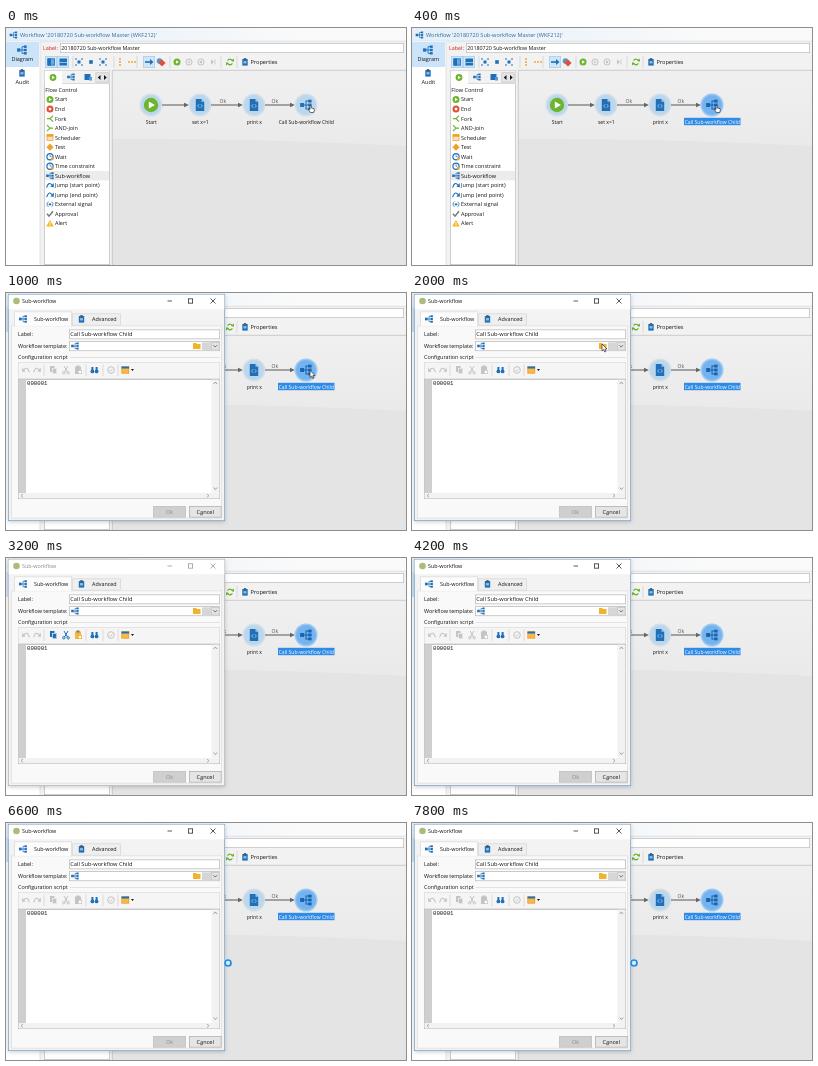
Animation of 400 by 237 pixels, one loop 8 s. Source, as an HTML page with a canvas:

```html
<!DOCTYPE html>
<html lang="en">
<head>
<meta charset="utf-8">
<style>
  html, body { margin: 0; width: 100%; height: 100%; overflow: hidden; background: #f2f2f2; }
  canvas { display: block; width: 400px; height: 237px; }
</style>
</head>
<body>
<canvas></canvas>
<script>
const W = 400, H = 237, LOOP = 8000, STEP = 200;
const BLUE = '#1f70b8', GREEN = '#6cb52d', ORANGE = '#f2a024', RED = '#e0503c', GREY = '#c4c4c4', INK = '#141414';
const canvas = document.querySelector('canvas');
const c = canvas.getContext('2d');
const dpr = window.devicePixelRatio || 1;
canvas.width = W * dpr;
canvas.height = H * dpr;

function rect(x, y, w, h, fill, border) {
  if (fill) { c.fillStyle = fill; c.fillRect(x, y, w, h); }
  if (border) {
    c.strokeStyle = border;
    c.lineWidth = 0.7;
    c.strokeRect(x + 0.35, y + 0.35, w - 0.7, h - 0.7);
  }
}
function line(points, color, width = 0.8) {
  c.beginPath();
  points.forEach(([x, y]) => c.lineTo(x, y));
  c.strokeStyle = color;
  c.lineWidth = width;
  c.stroke();
}
function shape(points, fill, border) {
  c.beginPath();
  points.forEach(([x, y]) => c.lineTo(x, y));
  c.closePath();
  c.fillStyle = fill;
  c.fill();
  if (border) { c.strokeStyle = border; c.lineWidth = 0.7; c.stroke(); }
}
function disc(x, y, r, fill) {
  c.beginPath();
  c.arc(x, y, r, 0, 7);
  c.fillStyle = fill;
  c.fill();
}
function ring(x, y, r, color, width = 1, from = 0, to = 7) {
  c.beginPath();
  c.arc(x, y, r, from, to);
  c.strokeStyle = color;
  c.lineWidth = width;
  c.stroke();
}
function text(str, x, y, size = 5.4, color = INK, align = 'left', family = '"Open Sans", sans-serif') {
  c.font = `${size}px ${family}`;
  c.textAlign = align;
  c.textBaseline = 'alphabetic';
  c.fillStyle = color;
  c.fillText(str, x, y + size * 0.36);
}

// Icons, each centred on x, y
function flow(x, y, s = 1, color = BLUE) {
  line([[x - 3 * s, y], [x + 3 * s, y]], color, 0.8 * s);
  line([[x + 3 * s, y - 3 * s], [x, y - 3 * s], [x, y + 3 * s], [x + 3 * s, y + 3 * s]], color, 0.8 * s);
  rect(x - 4.5 * s, y - 1.5 * s, 3 * s, 3 * s, color);
  for (const d of [-3, 0, 3]) rect(x + 1.7 * s, y + (d - 1.1) * s, 2.6 * s, 2.2 * s, color);
}
function play(x, y, r, color = GREEN) {
  disc(x, y, r, color);
  shape([[x - r * 0.3, y - r * 0.5], [x + r * 0.55, y], [x - r * 0.3, y + r * 0.5]], '#fff');
}
function clipboard(x, y, s = 1) {
  rect(x - 3 * s, y - 3.3 * s, 6 * s, 7.3 * s, BLUE);
  rect(x - 1.3 * s, y - 4.3 * s, 2.6 * s, 2 * s, '#555');
  rect(x - 1.6 * s, y - 1 * s, 3.2 * s, 2.6 * s, '#8fc0e8');
}
function script(x, y) {
  shape([[x - 4.2, y - 6], [x + 1.5, y - 6], [x + 4.2, y - 3.3], [x + 4.2, y + 6], [x - 4.2, y + 6]], BLUE);
  shape([[x + 1.5, y - 6], [x + 4.2, y - 3.3], [x + 1.5, y - 3.3]], '#9cc8ec');
  line([[x - 0.8, y - 0.8], [x - 2.4, y + 1], [x - 0.8, y + 2.8]], '#c5dff3', 0.7);
  line([[x + 0.8, y - 0.8], [x + 2.4, y + 1], [x + 0.8, y + 2.8]], '#c5dff3', 0.7);
}
function arrow(x, y, color = BLUE) {
  line([[x - 4, y], [x + 2, y]], color, 1.6);
  shape([[x + 1, y - 3], [x + 4.5, y], [x + 1, y + 3]], color);
}
function curl(x, y, color, dir = 1) {
  c.beginPath();
  c.moveTo(x - 3.4 * dir, y + 2.4);
  c.quadraticCurveTo(x - 1.5 * dir, y - 4.5, x + 2.4 * dir, y);
  c.strokeStyle = color;
  c.lineWidth = 1.1;
  c.stroke();
  shape([[x + 3.8 * dir, y - 2.2], [x + 3.8 * dir, y + 2], [x + 0.4 * dir, y + 1.6]], color);
}
function refresh(x, y) {
  ring(x, y, 2.7, GREEN, 1.2, 0.5, 2.9);
  ring(x, y, 2.7, GREEN, 1.2, 3.6, 6);
  shape([[x + 1, y - 1.2], [x + 4, y - 3.5], [x + 4, y - 0.3]], GREEN);
  shape([[x - 1, y + 1.2], [x - 4, y + 3.5], [x - 4, y + 0.3]], GREEN);
}
function fork(x, y) {
  line([[x - 3, y], [x, y], [x + 3, y - 3]], GREEN, 1.2);
  line([[x, y], [x + 3, y + 3]], GREEN, 1.2);
}
function diamond(x, y, color) {
  shape([[x, y - 3.6], [x + 3.6, y], [x, y + 3.6], [x - 3.6, y]], color);
}
function clock(x, y) {
  ring(x, y, 3.1, BLUE, 1.2);
  line([[x, y - 2], [x, y], [x + 1.5, y]], BLUE, 0.7);
  disc(x + 2.2, y + 2.2, 1.4, ORANGE);
}

const ACTIVITIES = [
  ['Start', (x, y) => play(x, y, 3.5)],
  ['End', (x, y) => { disc(x, y, 3.5, RED); rect(x - 1.2, y - 1.2, 2.4, 2.4, '#fff'); }],
  ['Fork', fork],
  ['AND-join', (x, y) => { c.save(); c.translate(2 * x, 0); c.scale(-1, 1); fork(x, y); c.restore(); }],
  ['Scheduler', (x, y) => { rect(x - 3.3, y - 3.3, 6.6, 6.6, '#fbe3bd', ORANGE); rect(x - 3.3, y - 3.3, 6.6, 2.4, ORANGE); }],
  ['Test', (x, y) => diamond(x, y, ORANGE)],
  ['Wait', clock],
  ['Time constraint', clock],
  ['Sub-workflow', (x, y) => flow(x, y, 0.85)],
  ['Jump (start point)', (x, y) => curl(x, y, BLUE)],
  ['Jump (end point)', (x, y) => curl(x, y, BLUE)],
  ['External signal', (x, y) => { disc(x, y, 1.2, BLUE); ring(x, y, 3, BLUE, 0.8, -1, 1); ring(x, y, 3, BLUE, 0.8, 2.1, 4.2); }],
  ['Approval', (x, y) => line([[x - 3, y], [x - 1, y + 2.3], [x + 3, y - 2.6]], '#6c7a86', 1.5)],
  ['Alert', (x, y) => { shape([[x, y - 3.5], [x + 3.8, y + 3], [x - 3.8, y + 3]], '#f5b81c'); line([[x, y - 1.3], [x, y + 2.2]], '#fff', 0.8); }],
];

function toolbar() {
  const y = 34;
  for (const [x, w] of [[39, 12], [51, 12], [137, 12]]) rect(x, y - 6, w, 12, '#cfe5f8', '#a5cdee');
  rect(41.5, 30.5, 7.5, 7, '#6aa9dd', BLUE); rect(41.5, 30.5, 3.5, 7, BLUE);
  rect(53.5, 30.5, 7.5, 7, BLUE); rect(53.5, 34, 7.5, 1, '#8fc0e8');
  for (const x of [73, 97]) {
    rect(x - 1.5, y - 1.5, 3, 3, BLUE);
    for (const a of [-1, 1]) for (const b of [-1, 1]) rect(x + a * 3 - 0.7, y + b * 3 - 0.7, 1.4, 1.4, BLUE);
  }
  rect(83.2, 32.2, 3.6, 3.6, BLUE);
  for (const d of [-3, 0, 3]) {
    disc(114, y + d, 0.9, ORANGE);
    disc(126 + d, y, 0.9, ORANGE);
  }
  arrow(143, y);
  disc(153.5, y - 1, 2.8, '#5b92c4'); diamond(156, y + 1, RED);
  play(171, y, 3.5);
  for (const x of [183, 195]) ring(x, y, 3.1, GREY);
  line([[182.2, 32.6], [182.2, 35.4]], GREY); line([[183.8, 32.6], [183.8, 35.4]], GREY);
  rect(193.8, 32.8, 2.4, 2.4, GREY);
  shape([[205, 31.5], [208, y], [205, 36.5]], GREY);
  line([[209, 31.5], [209, 36.5]], GREY);
  refresh(224, y);
  for (const x of [67, 108, 131, 164, 215, 231]) line([[x, 28], [x, 40]], '#d0d0d0', 0.7);
  clipboard(239, y, 0.9);
  text('Properties', 244.5, y, 5.6);
}

function palette() {
  rect(38, 42, 66, 195, '#fff', '#b8b8b8');
  rect(38, 42, 66, 14, '#f2f2f2', '#d0d0d0');
  rect(39, 43, 17, 13, '#fff');
  play(47, 49.5, 3.4);
  flow(65, 49, 0.85);
  rect(78.5, 46, 6, 6, BLUE); rect(83, 49, 3, 3.5, '#5a9bd5');
  rect(89.5, 44.5, 13, 10, '#e6e6e6', '#c4c4c4');
  shape([[94.5, 47], [94.5, 52], [91.8, 49.5]], INK);
  shape([[98, 47], [98, 52], [100.7, 49.5]], INK);
  text('Flow Control', 39.3, 61.7, 5.5);
  ACTIVITIES.forEach(([name, icon], i) => {
    const y = 71.5 + i * 9.53;
    if (name === 'Sub-workflow') rect(39, y - 4.7, 64, 9.4, '#ececec');
    icon(44, y);
    text(name, 49, y, 5.5);
  });
}

function diagram(selected) {
  const sky = c.createLinearGradient(0, 42, 0, 116);
  sky.addColorStop(0, '#f0f0f0');
  sky.addColorStop(1, '#eaeaea');
  rect(106, 42, 294, 195, sky);
  c.beginPath();
  c.moveTo(106, 111);
  c.quadraticCurveTo(250, 110, 400, 118);
  c.lineTo(400, H);
  c.lineTo(106, H);
  c.fillStyle = '#e4e4e4';
  c.fill();
  line([[400, 42.3], [106.3, 42.3], [106.3, H]], '#bdbdbd', 0.7);

  const nodes = [[145, 'Start'], [194, 'set x=1'], [248, 'print x'], [300, 'Call Sub-workflow Child']];
  nodes.forEach(([x, label], i) => {
    const active = selected && i === 3;
    if (i) {
      line([[nodes[i - 1][0] + 11, 77], [x - 14, 77]], '#666', 1.1);
      shape([[x - 16, 74.8], [x - 11, 77], [x - 16, 79.2]], '#666');
      if (i > 1) text('Ok', x - 34.5, 73, 5, '#555');
    }
    disc(x, 77, 11.5, active ? '#9bc8f3' : '#d3dfe9');
    disc(x, 77, 10, active ? '#74b3ee' : '#bcd6ec');
    if (i === 0) play(x, 77, 7.2);
    else if (i < 3) script(x, 77);
    else flow(x, 77, 1.3, active ? '#1763b0' : BLUE);
    if (active) rect(272, 89.8, 56.5, 7.4, '#2f8be6');
    text(label, x + 0.3, 93.7, 5.05, active ? '#fff' : INK, 'center');
  });
}

function mainWindow(selected) {
  rect(0, 0, W, H, '#f2f2f2');
  const bar = c.createLinearGradient(0, 0, 300, 0);
  bar.addColorStop(0, '#e4eff9');
  bar.addColorStop(1, '#fafafa');
  rect(0, 0, W, 13, bar);
  line([[0, 13.2], [W, 13.2]], '#d0dae3', 0.7);
  flow(7.5, 7, 0.85);
  text("Workflow '20180720 Sub-workflow Master (WKF212)'", 14, 7, 5.6, '#2f6a9e');
  rect(0, 13.5, 34, 224, '#fff');
  rect(0, 14, 33, 25, '#cbe4f9');
  line([[34, 13.5], [34, H]], '#d8d8d8', 0.7);
  flow(16, 22, 1.1);
  text('Diagram', 16.3, 31.5, 5.5, INK, 'center');
  clipboard(16, 45, 0.9);
  text('Audit', 16.3, 54, 5.5, INK, 'center');
  text('Label:', 37, 20, 5.4, '#d02020');
  rect(54, 15, 344, 10, '#fff', '#bababa');
  text('20180720 Sub-workflow Master', 55.3, 20, 5.35);
  toolbar();
  palette();
  diagram(selected);
}

function editorTools(live) {
  const y = 77, tint = color => live ? color : GREY;
  curl(20, y, GREY, -1);
  curl(31, y, GREY);
  rect(44, y - 4, 4.5, 6, tint(BLUE)); rect(46, y - 2, 5, 6, tint(BLUE), '#f2f2f2');
  line([[58, y - 4], [61.5, y + 2]], tint(BLUE), 1); line([[62, y - 4], [58.5, y + 2]], tint(BLUE), 1);
  ring(57.8, y + 2.8, 1.2, tint(BLUE)); ring(62.2, y + 2.8, 1.2, tint(BLUE));
  rect(69, y - 3.5, 6, 7.5, tint('#f0b93a')); rect(70.5, y - 4.5, 3, 2, tint('#777')); rect(72, y, 4, 4, '#fff', tint(ORANGE));
  for (const x of [86.4, 90.6]) { rect(x - 1, y - 3, 2, 3.5, BLUE); disc(x, y + 1.4, 1.9, BLUE); }
  ring(105, y, 3.3, GREY);
  line([[103.4, y], [104.6, y + 1.3], [106.8, y - 1.4]], GREY);
  rect(115.5, y - 3.5, 7.6, 7, '#f5b84a', ORANGE); rect(115.5, y - 3.5, 7.6, 2, BLUE);
  shape([[125, y - 1], [128, y - 1], [126.5, y + 1]], INK);
  for (const x of [38, 80, 97, 112]) line([[x, 71.5], [x, 83]], '#d0d0d0', 0.7);
}

function dialog(focused, live) {
  c.save();
  c.shadowColor = 'rgba(0,0,0,.2)';
  c.shadowBlur = 4 * dpr;
  c.shadowOffsetY = dpr;
  rect(2, 1, 217, 227, '#f3f3f3');
  c.restore();
  rect(2, 1, 217, 227, '#f3f3f3', focused ? '#6f9fc8' : '#b0b0b0');
  rect(2.7, 1.7, 215.6, 14.5, '#fff');

  const ink = focused ? INK : '#8a8a8a';
  disc(10.5, 8, 3.3, '#a9bd7b');
  text('Sub-workflow', 16, 8, 5.4, ink);
  line([[161.5, 8], [166, 8]], ink, 0.7);
  rect(182, 5.5, 5, 5, null, ink);
  line([[204.5, 5.5], [209.5, 10.5]], ink, 0.7);
  line([[209.5, 5.5], [204.5, 10.5]], ink, 0.7);

  rect(5, 32.5, 211, 193, '#f9f9f9', '#dcdcdc');
  rect(66, 20.5, 49, 12, '#efefef', '#d6d6d6');
  rect(8, 18.5, 58, 14.8, '#fcfcfc', '#d6d6d6');
  rect(8.7, 32, 56.6, 1.5, '#fafafa');
  flow(17, 26, 0.9);
  text('Sub-workflow', 28, 26);
  clipboard(75.5, 26, 0.9);
  text('Advanced', 86, 26);

  text('Label:', 12, 41.2);
  rect(63, 36.5, 151, 9.7, '#fff', '#b5b5b5');
  text('Call Sub-workflow Child', 64.2, 41.2, 5.7);
  text('Workflow template:', 12, 53, 5.45);
  rect(63, 48.3, 151, 9.8, '#fff', '#b5b5b5');
  flow(69, 53, 0.85);
  shape([[187, 50], [190, 50], [191, 51], [194.5, 51], [194.5, 56], [187, 56]], '#f0b429');
  rect(196, 49.3, 9, 7.8, '#d6d6d6');
  rect(205, 49, 8.4, 8.4, '#e4e4e4', '#c4c4c4');
  line([[207.4, 52.2], [209.2, 54.1], [211, 52.2]], '#555');

  text('Configuration script', 12, 64);
  line([[64, 64.5], [214, 64.5]], '#d8d8d8', 0.7);
  rect(12, 69, 202, 17, '#f5f5f5', '#dcdcdc');
  editorTools(live);

  rect(12, 86, 202, 120, '#fff', '#adadad');
  rect(12.7, 86.7, 7.3, 118.6, '#cfcfcf');
  text('000001', 21, 90.2, 5.7, INK, 'left', '"Liberation Mono", monospace');
  rect(205.5, 86.7, 7.8, 113, '#f2f2f2');
  rect(12.7, 200, 200.6, 5.3, '#f2f2f2');
  for (const [y, d] of [[90, -1], [195.5, 1]]) line([[207.7, y - d], [209.4, y + d], [211.1, y - d]], '#888');
  for (const [x, d] of [[16, -1], [202, 1]]) line([[x - d, 201], [x + d, 202.7], [x - d, 204.4]], '#999');

  rect(147, 213, 33, 11.5, '#cfcfcf', '#c4c4c4');
  text('Ok', 163.5, 218.7, 5.4, '#8a8a8a', 'center');
  rect(183, 213, 32.5, 11.5, '#e5e5e5', '#adadad');
  text('Cancel', 199.2, 218.7, 5.6, INK, 'center');
  line([[194, 221.7], [197, 221.7]], INK, 0.5);
}

// Pointer stops: time, x, y
const STOPS = [[0, 304, 77.5], [1000, 304, 77.5], [1800, 190, 51], [2400, 190, 51], [3000, 346, 236], [5000, 390, 205], [5800, 222, 140], [LOOP, 222, 140]];
const HAND = [[0, 0], [1.2, 0], [1.2, 2.4], [4, 3.2], [4.4, 4.8], [3.6, 7], [0.4, 7], [-1.6, 4], [-0.8, 3.4], [0, 4.2]];
const ARROW = [[0, 0], [0, 7], [1.7, 5.5], [2.8, 8], [3.9, 7.5], [2.8, 5.1], [5, 5]];

function pointer(t) {
  if (t >= 3000 && t <= 5000) return;
  const i = STOPS.findIndex(stop => stop[0] > t);
  const [t0, x0, y0] = STOPS[i - 1], [t1, x1, y1] = STOPS[i];
  const k = (t - t0) / (t1 - t0);
  const x = x0 + (x1 - x0) * k, y = y0 + (y1 - y0) * k;
  if (t >= 5800) {
    disc(x, y, 4.2, '#d7ecfc');
    ring(x, y, 3, '#2789dc', 1.7);
  } else {
    shape((t < 1000 ? HAND : ARROW).map(([a, b]) => [x + a, y + b]), '#fff', '#333');
  }
}

function draw(now) {
  const t = Math.floor(now % LOOP / STEP) * STEP;
  c.setTransform(dpr, 0, 0, dpr, 0, 0);
  mainWindow(t >= 400);
  if (t >= 800) {
    const away = t >= 3000 && t < 4000;
    dialog(!away, away);
  } else if (t >= 600) {
    // Opening: the window still grows and lets the page show through
    const base = document.createElement('canvas');
    base.width = canvas.width;
    base.height = canvas.height;
    base.getContext('2d').drawImage(canvas, 0, 0);
    c.translate(110, 114);
    c.scale(0.985, 0.985);
    c.translate(-110, -114);
    dialog(true, false);
    c.setTransform(1, 0, 0, 1, 0, 0);
    c.globalAlpha = 0.18;
    c.drawImage(base, 0, 0);
    c.globalAlpha = 1;
    c.setTransform(dpr, 0, 0, dpr, 0, 0);
  }
  pointer(t);
}

const start = performance.now();
function tick() {
  draw(performance.now() - start);
  requestAnimationFrame(tick);
}
tick();
</script>
</body>
</html>
```
